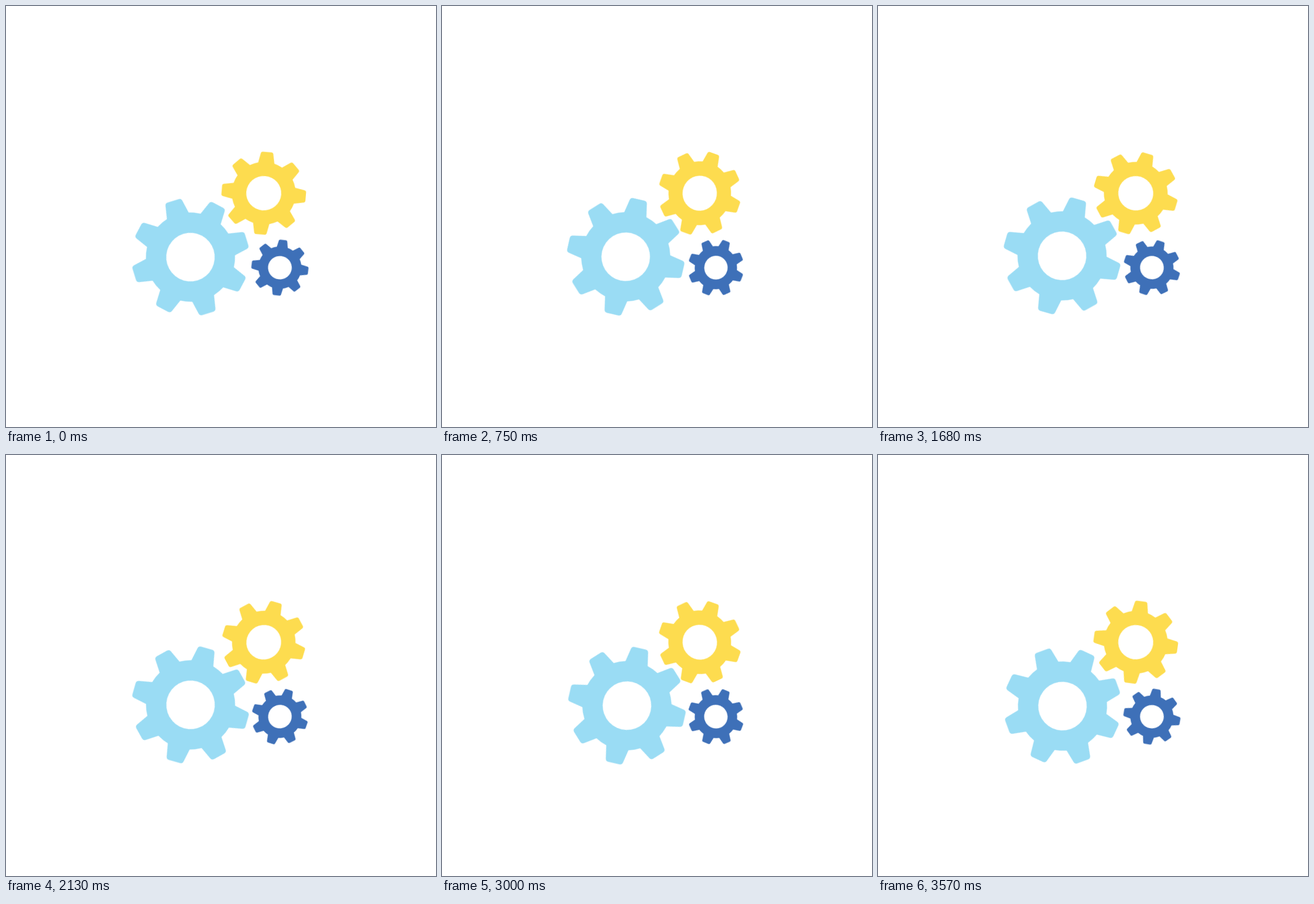
Animation, 757 px wide and 740 px high, one loop 3.6 s. Source, as an HTML page:

```html
<!DOCTYPE html>
<html lang="en">
<head>
<meta charset="utf-8">
<title>Turning gears</title>
<style>
  html, body { margin: 0; width: 100%; height: 100%; overflow: hidden; background: #fff; }
  svg { display: block; width: 757px; height: 740px; }
</style>
</head>
<body>
<svg id="stage" viewBox="0 0 757 740"></svg>
<script>
const LOOP = 3600, STEPS = 120, TEETH = 8;
const BODY = 78.5, TIP = 103.5;

// x, y: pivot; dx, dy: gear centre relative to the pivot; phase: tooth angle at rest
const gears = [
  { x: 324.5, y: 440.25, dx: 0.25, dy: 1.15, size: 1, hole: 42.7, phase: -17.1, stretch: 1, dir: 1, color: '#9adcf4' },
  { x: 453.75, y: 329.1, dx: 0, dy: 0, size: 0.709, hole: 30.5, phase: 4.7, stretch: 1.011, dir: -1, color: '#fddc4f' },
  { x: 482.2, y: 459.9, dx: 0, dy: 0, size: 0.479, hole: 20.7, phase: 6.6, stretch: 1.011, dir: -1, color: '#3e70b8' }
];

// Right half of an upright tooth: [sideways, outwards]
const base = [20, Math.sqrt(BODY * BODY - 400)];
const side = [15.5, 99.1], corner = [14.6, TIP], flat = [10.1, TIP];

function gearPath(size, hole) {
  let d = '';
  for (let i = 0; i < TEETH; i++) {
    const a = i * 2 * Math.PI / TEETH, c = Math.cos(a), s = Math.sin(a);
    const pt = ([u, v], sign) => {
      const x = (sign * u * c + v * s) * size;
      const y = (sign * u * s - v * c) * size;
      return x.toFixed(2) + ' ' + y.toFixed(2);
    };
    const r = BODY * size;
    d += (i ? `A${r} ${r} 0 0 1 ` : 'M') + pt(base, -1)
      + 'L' + pt(side, -1) + 'Q' + pt(corner, -1) + ' ' + pt(flat, -1)
      + 'L' + pt(flat, 1) + 'Q' + pt(corner, 1) + ' ' + pt(side, 1)
      + 'L' + pt(base, 1);
    if (i === TEETH - 1) d += `A${r} ${r} 0 0 1 ` + pt(base, -1).replace(/.*/, firstBase(size)) + 'Z';
  }
  return d + `M${hole} 0A${hole} ${hole} 0 1 0 ${-hole} 0A${hole} ${hole} 0 1 0 ${hole} 0Z`;
}

function firstBase(size) {
  return `${-base[0] * size} ${-base[1] * size}`;
}

function add(parent, tag, attrs) {
  const el = document.createElementNS('http://www.w3.org/2000/svg', tag);
  for (const k in attrs) el.setAttribute(k, attrs[k]);
  return parent.appendChild(el);
}

const stage = document.getElementById('stage');
for (const g of gears) {
  const place = add(stage, 'g', { transform: `translate(${g.x} ${g.y})` });
  const spin = add(place, 'g', {});
  spin.style.transformOrigin = '0 0';
  add(spin, 'path', {
    d: gearPath(g.size, g.hole),
    fill: g.color,
    'fill-rule': 'evenodd',
    transform: `translate(${g.dx} ${g.dy}) scale(${g.stretch} ${1 / g.stretch}) rotate(${g.phase})`
  });
  spin.animate(
    [{ transform: 'rotate(0deg)' }, { transform: `rotate(${360 * g.dir}deg)` }],
    { duration: LOOP, iterations: Infinity, easing: `steps(${STEPS}, end)`, delay: -1 }
  );
}
</script>
</body>
</html>
```
